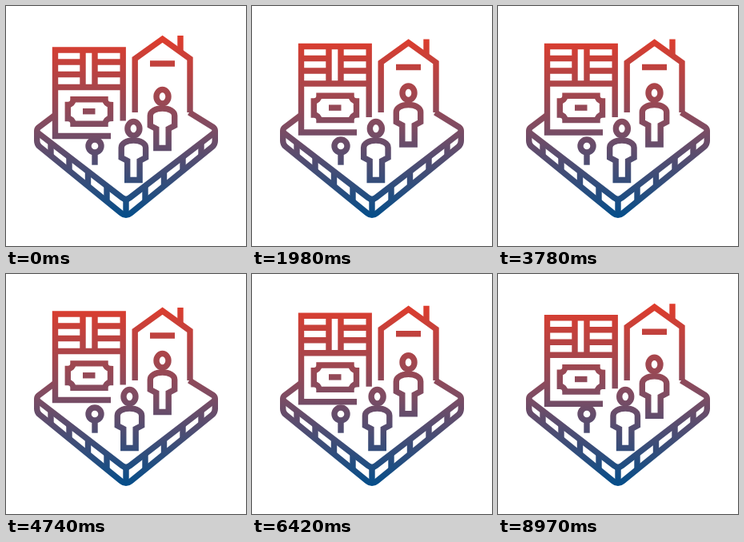
An HTML page that plays this animation: 300 px wide and 300 px high, repeating every 9000 ms.

```html
<!DOCTYPE html>
<html lang="en">
<head>
<meta charset="utf-8">
<title>Neighbourhood</title>
<style>
  html, body { margin: 0; width: 100%; height: 100%; overflow: hidden; background: #fff; }
  svg { display: block; width: 100vw; height: 100vh; }
</style>
</head>
<body>
<svg viewBox="0 0 300 300">
  <defs>
    <linearGradient id="tint" gradientUnits="userSpaceOnUse" x1="0" y1="36" x2="0" y2="265">
      <stop offset="0" stop-color="#e13c2b"/>
      <stop offset=".5" stop-color="#804c62"/>
      <stop offset="1" stop-color="#044e8a"/>
    </linearGradient>
    <g id="person">
      <ellipse cy="12.200" rx="7.500" ry="8.700"/>
      <path d="M0 27C-9 27 -15.200 31 -15.200 36V48.500L-7.700 52.500V76.500H7.700V52.500L15.200 48.500V36C15.200 31 9 27 0 27Z"/>
    </g>
    <!-- The gradient stays fixed to the stage while the outlines move through it. -->
    <mask id="lines" maskUnits="userSpaceOnUse" x="0" y="0" width="300" height="300">
      <g fill="none" stroke="#fff" stroke-width="7.4">
        <path d="M61 136.500L41 151.500Q36.500 155.500 41 159.500L145 239.500Q150 243.500 155 239.500L259 159.500Q263.500 155.500 259 151.500L229 133"/>
        <path d="M38.700 155.500V168.500Q38.700 173 42 175.800L144 258.800Q150 263.700 156 258.800L258 175.800Q261.300 173 261.300 168.500V155.500"/>
        <path id="ticks"/>
        <circle cx="111" cy="175" r="8"/>
        <path d="M111 183V198.700"/>
        <g id="building">
          <path d="M131 162H61.500V54.500H146.200V143"/>
          <path d="M61 69.500H96M111 69.500H146M61 85H96M111 85H146M61 101H146M96 54V101M111 54V101"/>
          <path d="M84 116.300H124A6.700 6.700 0 0 0 130.500 123V140A6.700 6.700 0 0 0 124 146.700H84A6.700 6.700 0 0 0 77.300 140V123A6.700 6.700 0 0 0 84 116.300Z"/>
          <path d="M96 131.200H111.500"/>
        </g>
        <path id="walls"/>
        <path id="roof" d="M218 37V58M180 72H211"/>
        <use id="walker" href="#person"/>
        <use id="jumper" href="#person"/>
      </g>
    </mask>
  </defs>
  <rect width="300" height="300" fill="url(#tint)" mask="url(#lines)"/>
</svg>
<script>
  const PERIOD = 450;
  const TRAVEL = 5;
  const byId = id => document.getElementById(id);
  const move = (id, x, y) => byId(id).setAttribute('transform', `translate(${x} ${y})`);

  let ticks = 'M150 241V262';
  for (const x of [56, 79, 102.5, 126]) {
    const top = 159.5 + (x - 41) * 0.769;
    const bottom = 175.8 + (x - 42) * 0.814;
    ticks += `M${x} ${top}V${bottom}M${300 - x} ${top}V${bottom}`;
  }
  byId('ticks').setAttribute('d', ticks);

  function draw(time) {
    const shift = TRAVEL * (1 - Math.cos(2 * Math.PI * time / PERIOD)) / 2;
    const eave = 66 + shift;
    // The walls keep their feet on the ground while the roof sinks.
    byId('walls').setAttribute('d', `M161.200 133V${eave}L195.600 ${eave - 24.8}L230 ${eave}V133`);
    move('roof', 0, shift);
    move('building', 0, 0.5 - shift);
    move('walker', 159.4 - shift, 141);
    move('jumper', 195.5, 101 - shift);
  }

  const start = performance.now();
  function tick() {
    draw((performance.now() - start) % 9000);
    requestAnimationFrame(tick);
  }
  draw(0);
  requestAnimationFrame(tick);
</script>
</body>
</html>
```
